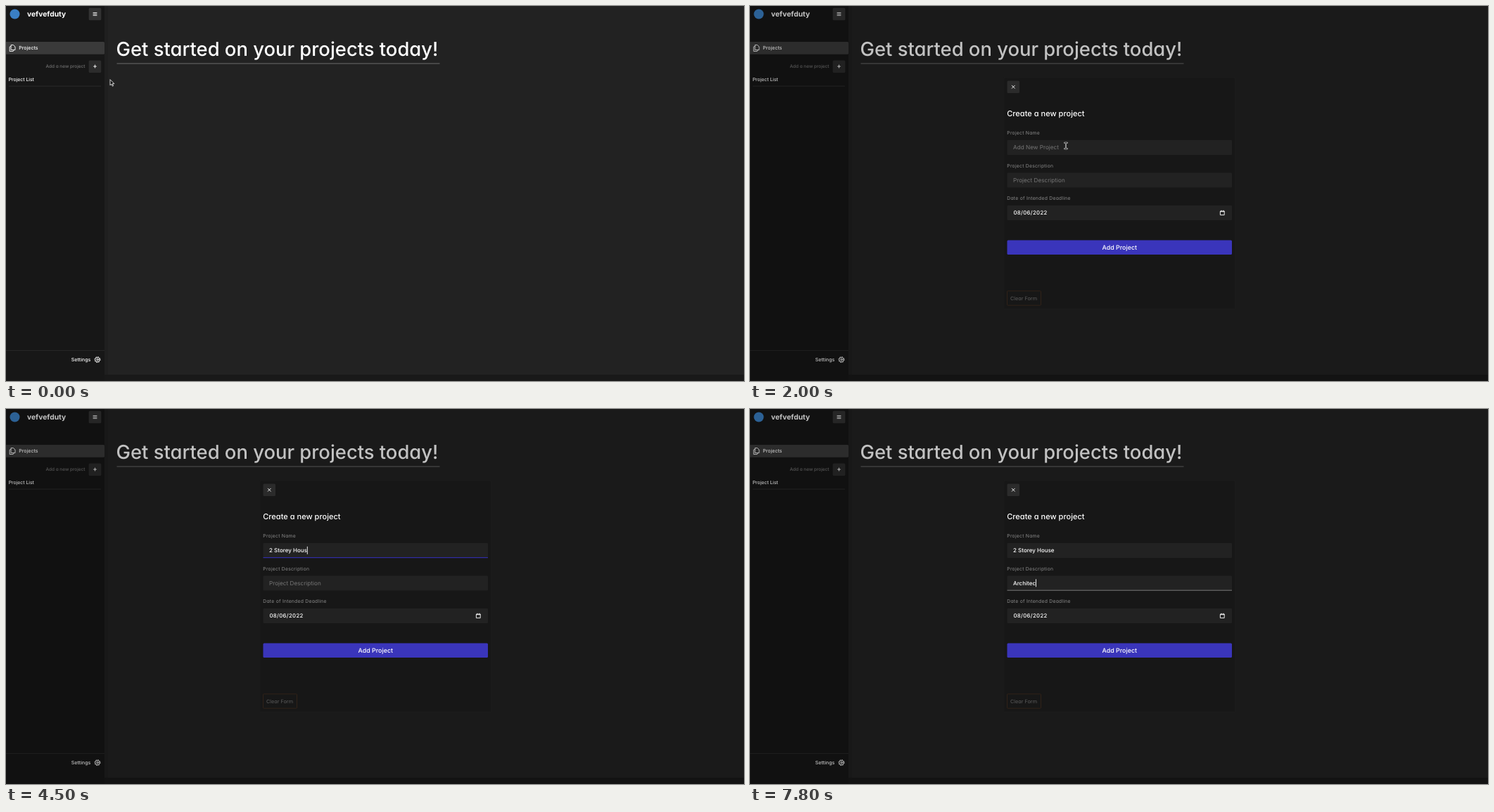
An HTML page that plays this animation: 1049x534 px, repeating every 8 s.

```html
<!DOCTYPE html>
<html lang="en">
<head>
<meta charset="utf-8">
<title>New project</title>
<style>
html, body { margin: 0; height: 100%; overflow: hidden; background: #222; }
svg { display: block; width: 1049px; height: 534px; }
text {
  font-family: Inter, "Open Sans", sans-serif; font-optical-sizing: none;
  font-feature-settings: "cv11"; text-rendering: geometricPrecision; white-space: pre;
}
.line { fill: none; stroke: #fff; stroke-width: .9; stroke-linecap: round; stroke-linejoin: round; }
#page.dimmed { filter: blur(.6px) brightness(.76); }
#addButton { fill: #2c2c2c; }
#addLabel { fill: #707070; }
.hover #addButton { fill: #3a35bb; stroke: #7672d8; stroke-width: .5; }
.hover #addLabel { fill: #fff; transform: translateX(.5px); }
#arrow { fill: #111; stroke: #fff; stroke-width: .8; }
#hand { fill: #fff; stroke: #222; stroke-width: .5; }
</style>
</head>
<body>
<svg id="stage" viewBox="0 0 1049 534"></svg>
<script>
const stage = document.getElementById('stage');
const LOOP = 8000, MODAL_AT = 1000, NAME_FOCUS = 2100, ABOUT_FOCUS = 5600;

const box = (x, y, w, h, fill, extra = '') =>
  `<rect x="${x}" y="${y}" width="${w}" height="${h}" fill="${fill}" ${extra}/>`;
const label = (x, y, size, text, fill = '#fff', extra = '') =>
  `<text x="${x}" y="${y}" font-size="${size}" fill="${fill}" ${extra}>${text}</text>`;
const stroke = d => `<path class="line" d="${d}"/>`;
const medium = 'font-weight="500"', spaced = 'letter-spacing=".25"', round = 'rx="1.5"';

const page = `<g id="page">
  ${box(-9, -9, 1070, 560, '#222')}
  ${box(140, 525, 920, 26, '#191919')}
  ${box(-9, -9, 149, 560, '#171717')}
  ${box(140, -9, 5, 534, '#1f1f1f')}
  <circle cx="12.5" cy="11.5" r="7" fill="#3a7fc4"/>
  ${label(30, 15.2, 10.3, 'vefvefduty', '#fff', 'font-weight="700"')}
  ${box(117.7, 2.7, 17.6, 17.6, '#323232', round)}
  ${stroke('M124 9.5h5M124 11.5h5M124 13.5h5')}
  ${box(-9, 51, 149, 17.8, '#3a3a3a', round)}
  ${stroke('M7.5 55.5h3l2.5 2.5v4.5h-5.5zM7 57.3l-1.8 .8v6.4h5l.8-1.5')}
  ${label(18.3, 62, 7, 'Projects', '#fff', medium)}
  ${label(112.5, 88.4, 6.45, 'Add a new project', '', `id="addLabel" text-anchor="end" ${medium}`)}
  ${box(117.7, 77.4, 17.6, 17.6, '', `id="addButton" ${round}`)}
  ${stroke('M124.5 86h4M126.5 84v4')}
  ${label(3.7, 107, 6.8, 'Project List', '#fff', medium)}
  ${box(4, 113.7, 131, .8, '#303030')}
  ${box(0, 490, 140, .8, '#2b2b2b')}
  ${label(120.3, 506.2, 7, 'Settings', '#fff', medium + ' text-anchor="end"')}
  <g class="line"><circle cx="130" cy="503.6" r="3.3"/><circle cx="130" cy="503.6" r="1.3"/>
  <circle cx="130" cy="503.6" r="4" style="stroke-linecap:butt" stroke-dasharray="1.57"/></g>
  ${label(156.5, 71, 27.4, 'Get started on your projects today!', '#fff', medium)}
  ${box(157.5, 81.5, 459, .9, '#747474')}
</g>`;

const field = (id, y, title) => `
  ${label(365.3, y - 7.6, 6.8, title, '#8a8a8a', spaced)}
  ${box(365.5, y, 319.5, 21, '#222', 'rx="1"')}
  ${id && box(365.5, y + 20.2, 319.5, 1, '', `id="${id}Line"`)}
  ${id && label(374, y + 13, 8, '', '', `id="${id}"`)}`;

const modal = `<g id="modal">
  ${box(361, 102, 328.5, 329.5, '#171717', 'stroke="#1d1d1d" stroke-width=".8"')}
  ${box(365.5, 106.5, 17.5, 17.5, '#2b2b2b', round)}
  ${stroke('M372.3 113.2l4 4m0-4l-4 4')}
  ${label(365.2, 157, 11.05, 'Create a new project', '#fff', medium)}
  ${field('name', 191, 'Project Name')}
  ${field('about', 237.5, 'Project Description')}
  ${field('', 284, 'Date of Intended Deadline')}
  ${label(374.5, 297.4, 7.8, '08/06/2022', '#fff', medium + ' letter-spacing=".3"')}
  ${stroke('M668.8 292.2h5.4v5.4h-5.4zM668.8 292.7h5.4M670 291.2v1M673 291.2v1')}
  ${box(365.5, 333.5, 319.5, 20.5, '#3a35bb', round)}
  ${label(525.3, 346.5, 8.9, 'Add Project', '#fff', medium + ' text-anchor="middle"')}
  ${box(365.5, 405.8, 48, 20.4, 'none', 'stroke="#3b2719" stroke-width=".7" rx="1"')}
  ${label(370, 418.6, 7.25, 'Clear Form', '#5c5c5c')}
  ${box(0, 0, .9, 11, '#fff', 'id="caret"')}
</g>`;

const beam = 'M-1.8-4.2h3.6M0-4.2v8.4M-1.8 4.2h3.6';
const pointers = `
  <path id="arrow" d="M0 0v8.2l1.9-1.7 1.4 3 1.3-.6-1.4-2.9h2.7z"/>
  <path id="hand" d="M1.3 1.2q.8-.8 1.4 .2l.5 2.4q2.3 0 3.2 1.3v2.3l-.8 1.9h-3.1l-2.6-3.3q.2-1 1.6 .1z"/>
  <g id="beam">
    <path class="line" style="stroke-width:1.9" d="${beam}"/>
    <path class="line" style="stroke:#111" d="${beam}"/>
  </g>`;

stage.innerHTML = page + modal + pointers;
const el = id => document.getElementById(id);
const show = (node, on) => node.setAttribute('visibility', on ? 'visible' : 'hidden');

const inputs = [
  { id: 'name', y: 191, text: '2 Storey House', hint: 'Add New Project', line: '#3530c4',
    from: NAME_FOCUS, to: ABOUT_FOCUS,
    keys: [2400, 2500, 2900, 3100, 3200, 3300, 3500, 3700, 3800, 4000, 4200, 4400, 4500, 4800] },
  { id: 'about', y: 237.5, text: 'Architec', hint: 'Project Description', line: '#777',
    from: ABOUT_FOCUS, to: LOOP,
    keys: [6700, 6900, 7100, 7100, 7300, 7400, 7600, 7800] }
];

const progress = (t, from, to) => Math.min(1, Math.max(0, (t - from) / (to - from)));
const smooth = k => k * k * (3 - 2 * k);
const bezier = (a, b, c, k) => (1 - k) ** 2 * a + 2 * k * (1 - k) * b + k * k * c;

function pointerAt(t) {
  if (t >= 2300) return [462, 157];
  if (t >= 2200) return [456, 173];
  if (t >= MODAL_AT) {
    const k = smooth(progress(t, 1200, 2000));
    return [bezier(127.2, 361, 449, k), bezier(86.7, 521, 199, k)];
  }
  const k = smooth(progress(t, 0, 500));
  return [148 - 20.8 * k, 104.7 - 18 * k];
}

function drawInput(input, t) {
  const count = input.keys.filter(at => at <= t).length;
  const focused = t >= input.from && t < input.to;
  const node = el(input.id);
  node.textContent = count ? input.text.slice(0, count) : input.hint;
  node.setAttribute('fill', count ? '#fff' : '#757575');
  node.setAttribute('font-weight', count ? 500 : 400);
  node.setAttribute('font-size', count ? 8 : 8.2);
  el(input.id + 'Line').setAttribute('fill', focused ? input.line : 'none');
  if (!focused) return;
  const lastKey = count ? input.keys[count - 1] : input.from;
  const x = 374 + (count ? node.getComputedTextLength() : .2);
  el('caret').setAttribute('x', x);
  el('caret').setAttribute('y', input.y + 4.8);
  show(el('caret'), Math.floor((t - lastKey) / 500) % 2 === 0);
}

function draw(t) {
  const open = t >= MODAL_AT, hover = t >= 400 && !open;
  el('page').setAttribute('class', open ? 'dimmed' : hover ? 'hover' : '');
  el('modal').style.display = open ? '' : 'none';
  show(el('caret'), false);
  if (open) inputs.forEach(input => drawInput(input, t));

  const [x, y] = pointerAt(t);
  const inField = open && x > 365 && x < 685 && [191, 237.5, 284].some(top => y > top && y < top + 21);
  const shape = t >= 2400 ? '' : hover ? 'hand' : inField ? 'beam' : 'arrow';
  for (const id of ['arrow', 'hand', 'beam']) {
    show(el(id), id === shape);
    el(id).setAttribute('transform', `translate(${x} ${y})`);
  }
}

// The picture updates ten times a second.
function tick() {
  draw(Math.floor(performance.now() % LOOP / 100) * 100);
  requestAnimationFrame(tick);
}
tick();
</script>
</body>
</html>
```
